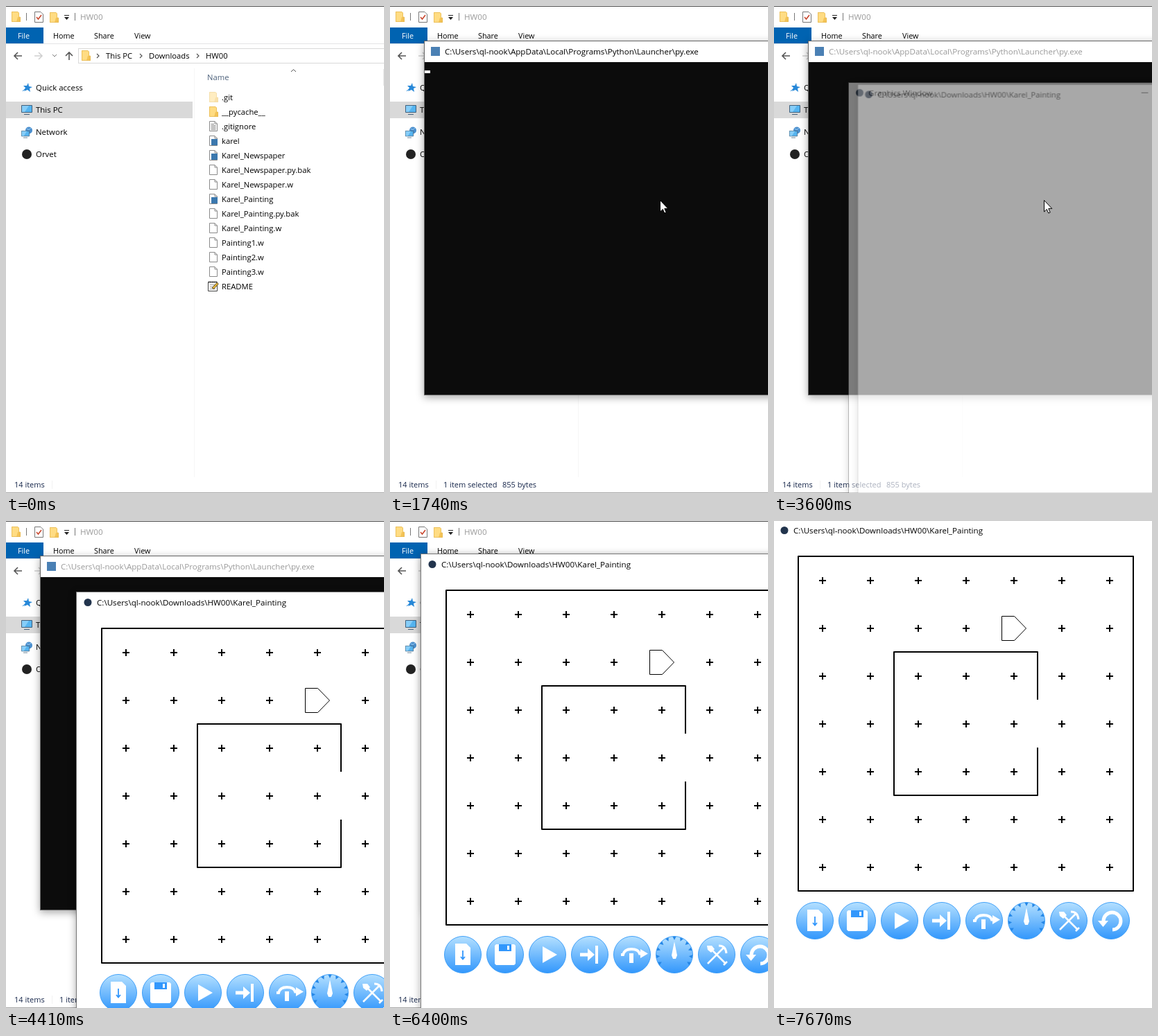
An HTML page that plays this animation: 545 px wide and 703 px high, repeating every 8000 ms.

```html
<!DOCTYPE html>
<html lang="en">
<head>
<meta charset="utf-8">
<title>Opening a script</title>
<style>
html, body { margin: 0; width: 100%; height: 100%; overflow: hidden; background: #fff; }
svg { display: block; width: 545px; height: 703px; font: 11.25px "Open Sans", "Noto Sans", sans-serif; }
.tab { font-size: 10.8px; }
.nav { font-size: 11.45px; }
.title { font-size: 11.6px; }
.status { font-size: 11px; fill: #16264a; }
.line { fill: none; stroke: #000; }
.win { filter: drop-shadow(0 3px 6px rgb(0 0 0 / .35)); }

.anim { animation: 8s step-end -20ms infinite; }
#cursor { animation-name: point; opacity: 0; }
#hover { animation-name: hover; opacity: 0; }
#selected { animation-name: select; opacity: 0; }
#count { animation-name: count; opacity: 0; }
#folderTitle { animation-name: focusFolder; fill: #999; }
#consoleTitle { animation-name: focusConsole; fill: #000; }
#console { animation-name: openConsole; opacity: 0; transform-origin: 530px 290px; }
#caret { animation-name: caret; opacity: 0; }
#blank { animation-name: blank; opacity: 0; transform-origin: 377px 475px; }
#drag { animation-name: drag; }
#karel { animation-name: openKarel; opacity: 0; transform-origin: 680px 428px; }
#world { animation-name: world; opacity: 0; }

@keyframes point {
  0% { opacity: 0; transform: translate(560px, 656px); }
  2.425% { opacity: 1; transform: translate(560px, 656px); animation-timing-function: steps(5); }
  6.575% { opacity: 1; transform: translate(445px, 396px); animation-timing-function: steps(4); }
  9.875% { opacity: 1; transform: translate(401px, 220px); animation-timing-function: steps(3); }
  12.375% { opacity: 1; transform: translate(389px, 280px); }
  53.375% { opacity: 1; transform: translate(407px, 238px); }
  54.25% { opacity: 1; transform: translate(441px, 162px); }
  55.125%, 100% { opacity: 0; transform: translate(441px, 162px); }
}
@keyframes hover {
  6.575% { opacity: 1; transform: translateY(273px); }
  7.4% { opacity: 1; transform: translateY(231px); }
  8.225% { opacity: 1; transform: translateY(168px); }
  9.05% { opacity: 1; transform: translateY(126px); }
  9.875% { opacity: 1; transform: translateY(84px); }
  10.7% { opacity: 1; transform: translateY(105px); }
  11.54% { opacity: 1; transform: translateY(126px); }
  12.375% { opacity: 1; transform: translateY(147px); }
  15.75%, 100% { opacity: 0; transform: translateY(147px); }
}
@keyframes select {
  15.75% { opacity: 1; fill: #cce8ff; }
  19.125%, 100% { opacity: 1; fill: #d9d9d9; }
}
@keyframes count { 15.75%, 100% { opacity: 1; } }
@keyframes focusFolder { 15.75% { fill: #000; } 19.125%, 100% { fill: #999; } }
@keyframes focusConsole { 23.25%, 100% { fill: #999; } }
@keyframes openConsole {
  19.125% { opacity: .354; transform: scale(.9677); }
  20.25% { opacity: .75; transform: scale(.988); }
  21.125% { opacity: .95; transform: scale(.997); }
  21.75%, 100% { opacity: 1; transform: none; }
}
@keyframes caret { 19.125% { opacity: 1; } 23.25%, 100% { opacity: 0; } }
@keyframes blank {
  23.25% { opacity: .354; transform: scale(.9677); }
  24.125% { opacity: .75; transform: scale(.988); }
  24.875% { opacity: .95; transform: scale(.997); }
  25.75% { opacity: 1; transform: none; }
  45% { opacity: .465; transform: scale(.9785); }
  45.875% { opacity: .15; transform: scale(.96); }
  46.75%, 100% { opacity: 0; transform: scale(.95); }
}
@keyframes openKarel {
  45% { opacity: .345; transform: scale(.967); }
  45.875% { opacity: .75; transform: scale(.988); }
  46.75% { opacity: .95; transform: scale(.997); }
  47.625%, 100% { opacity: 1; transform: none; }
}
@keyframes world { 48.5%, 100% { opacity: 1; } }
@keyframes drag {
  0% { transform: translate(0, 0); }
  64.3% { transform: translate(0, 0); animation-timing-function: steps(4); }
  67.5875% { transform: translate(-8px, -8px); animation-timing-function: steps(5); }
  71.7125% { transform: translate(-48px, -48px); animation-timing-function: steps(4); }
  75% { transform: translate(-56px, -52px); }
  79.25% { transform: translate(-56px, -54px); }
  80% { transform: translate(-57px, -55px); animation-timing-function: steps(3); }
  82.5% { transform: translate(-63px, -61px); animation-timing-function: steps(5); }
  86.675% { transform: translate(-98px, -96px); animation-timing-function: steps(2); }
  88.375% { transform: translate(-100px, -100px); }
  90% { transform: translate(-102px, -102px); }
  90.875% { transform: translate(-103px, -103px); }
  95.875%, 100% { transform: translate(-103px, -104px); }
}
</style>
</head>
<body>
<svg viewBox="0 0 545 703">
  <defs>
    <linearGradient id="sky" x2="0" y2="1">
      <stop stop-color="#b4e0ff"/><stop offset="1" stop-color="#3297fc"/>
    </linearGradient>
    <g id="folder">
      <path d="M0 0H9L11 2V15H0Z" fill="#ffdc83"/>
      <path d="M9 8H13V15H7Z" fill="#f3c357"/>
      <path d="M.5 .5H9L10.5 2V8H12.5V14.5H.5Z" fill="none" stroke="#e8b951" stroke-width=".8"/>
    </g>
    <g id="page">
      <path d="M.5 .5H8L11.5 4V14.5H.5Z" fill="#fff" stroke="#8a8a8a"/>
      <path d="M8 .5V4H11.5" fill="none" stroke="#8a8a8a"/>
    </g>
    <g id="text">
      <use href="#page"/>
      <path d="M2.5 4.5H7M2.5 6.5H9.5M2.5 8.5H9.5M2.5 10.5H9.5M2.5 12.5H9.5" stroke="#8a8a8a"/>
    </g>
    <g id="script">
      <use href="#page"/>
      <rect x="3" y="5" width="9" height="9" fill="#3b78ae"/>
    </g>
    <g id="note">
      <path d="M-1.5 1.5H11.5V14.5H-1.5Z" fill="#fff" stroke="#444"/>
      <path d="M-1 1.5H11" stroke="#333" stroke-width="2" stroke-dasharray="1.5 1"/>
      <path d="M1 5.5H8M1 8.5H6M1 11.5H9" stroke="#999"/>
      <path d="M5 11L12.5 3" stroke="#5a4a20" stroke-width="3.4"/>
      <path d="M5.5 10.5L12 3.5" stroke="#e9b83c" stroke-width="2"/>
    </g>
    <g id="monitor">
      <path d="M.5 .5H15.5V10.5H.5Z" fill="#55b4f0" stroke="#41607c"/>
      <path d="M1 1H11L5 10H1Z" fill="#86cdf8"/>
      <path d="M4 13.5H12" stroke="#41607c"/>
    </g>
    <path id="chevron" d="M0 -3L3 0L0 3" fill="none" stroke="#555" stroke-width="1.2"/>
    <circle id="badge" cx="118" cy="117.500" r="5.500" fill="#22344d"/>
  </defs>

  <g id="explorer">
    <rect width="545" height="703" fill="#fff"/>
    <path d="M0 .5H545" stroke="#505050"/>
    <path d="M0 702.500H545" stroke="#a8a8a8"/>
    <path d="M0 54.500H545" stroke="#e3e4e5"/>
    <use href="#folder" x="8" y="8"/>
    <path d="M29.500 10V21M99.500 10V21" stroke="#777"/>
    <path d="M41.500 8.500H50L53.500 12V23.500H41.500Z" fill="#fff" stroke="#777"/>
    <path d="M44 16L46.500 19L51 13" class="line" style="stroke:#c8452c;stroke-width:1.6"/>
    <use href="#folder" x="63" y="9"/>
    <path d="M84 13.500H91" stroke="#222"/><path d="M84 16H91L87.500 20Z" fill="#222"/>
    <text id="folderTitle" class="title anim" x="107" y="20">HW00</text>

    <rect y="31" width="54" height="23" fill="#0063b1"/>
    <g class="tab">
      <text x="17" y="47" fill="#fff">File</text>
      <text x="68" y="47">Home</text><text x="127" y="47">Share</text><text x="185" y="47">View</text>
    </g>
    <path d="M23 72H12M17 67L12 72L17 77" class="line" style="stroke:#555;stroke-width:1.6"/>
    <path d="M41 72H52M47 67L52 72L47 77" class="line" style="stroke:#d0d0d0;stroke-width:1.6"/>
    <path d="M67 70L70 73L73 70" class="line" style="stroke:#777"/>
    <path d="M91 78V67M86 72L91 67L96 72" class="line" style="stroke:#555;stroke-width:1.6"/>
    <rect x="104.500" y="61.500" width="460" height="21" fill="#fff" stroke="#d9d9d9"/>
    <use href="#folder" x="109" y="64"/>
    <use href="#chevron" x="131" y="72"/><use href="#chevron" x="193" y="72"/><use href="#chevron" x="275" y="72"/>
    <text x="144" y="76">This PC</text><text x="206" y="76">Downloads</text><text x="288" y="76">HW00</text>

    <rect y="138" width="269" height="24" fill="#d9d9d9"/>
    <path d="M271.500 90V680" stroke="#f6f6f6"/>
    <path d="M32 111L33 116L38 117L34 119L35 124L31 121L26 123L28 118L25 115L30 115Z" fill="#2788d8"/>
    <path d="M24 123L28 119" stroke="#2788d8"/>
    <use href="#monitor" x="22" y="143"/>
    <circle cx="33" cy="179.500" r="5" fill="#4b8fce"/>
    <path d="M30 177Q33 180 36 176" class="line" style="stroke:#a5d4f4"/>
    <use href="#monitor" transform="translate(22 180) scale(.75)"/>
    <circle cx="30" cy="214" r="7" fill="#222"/>
    <g class="nav">
      <text x="43" y="122">Quick access</text><text x="43" y="154">This PC</text>
      <text x="43" y="186">Network</text><text x="43" y="218">Orvet</text>
    </g>

    <text x="290" y="107" fill="#4c607a">Name</text>
    <path d="M411 95L414.500 91.500L418 95" class="line" style="stroke:#555"/>
    <path d="M544.500 91V115" stroke="#e5e5e5"/>
    <rect id="hover" class="anim" x="287" y="121" width="260" height="22" fill="#e5f3ff"/>
    <rect id="selected" class="anim" x="287" y="268" width="260" height="22"/>
    <g id="files"></g>

    <g class="status">
      <text x="12" y="695">14 items</text>
      <g id="count" class="anim"><text x="77" y="695">1 item selected</text><text x="162" y="695">855 bytes</text></g>
    </g>
    <path d="M66.500 685V697" stroke="#f2f2f2"/>
  </g>

  <g id="console" class="win anim">
    <rect x="50" y="51" width="960" height="510" fill="#0c0c0c"/>
    <rect x="50" y="51" width="960" height="30" fill="#fff"/>
    <rect x="49.500" y="50.500" width="961" height="511" fill="none" stroke="#666"/>
    <rect x="59" y="59" width="13" height="13" fill="#4a80b4"/>
    <text id="consoleTitle" class="title anim" x="79" y="70">C:\Users\ql-nook\AppData\Local\Programs\Python\Launcher\py.exe</text>
    <rect id="caret" class="anim" x="50" y="93" width="8" height="4" fill="#fff"/>
  </g>

  <g id="blank" class="win anim">
    <rect x="101.500" y="102.500" width="552" height="745" fill="#fff" stroke="#555"/>
    <use href="#badge"/>
    <text class="title" x="131" y="122">Graphics Window</text>
    <path d="M533 117.500H543" stroke="#000"/>
  </g>

  <g id="drag" class="anim">
    <g id="karel" class="win anim">
      <rect x="101.500" y="102.500" width="1157" height="740" fill="#fff" stroke="#777"/>
      <use href="#badge"/>
      <text class="title" x="131" y="122">C:\Users\ql-nook\Downloads\HW00\Karel_Painting</text>
      <g id="world" class="anim">
        <g class="line" stroke-width="2">
          <path d="M138 155H621V638H138Z" stroke-linejoin="round"/>
          <path d="M483 362V293H276V500H483V431" stroke-linejoin="round"/>
          <path id="crosses"/>
        </g>
        <path d="M431.500 241.500H449.500L466.500 259L449.500 276.500H431.500Z" fill="#fff" stroke="#000"/>
        <g id="buttons" fill="#fff"></g>
      </g>
    </g>
  </g>

  <path id="cursor" class="anim" d="M.5 .5V17L4.300 13.400L6.800 19L9.200 18L6.800 12.400H11.800Z" fill="#fff" stroke="#000"/>
</svg>
<script>
const byId = id => document.getElementById(id);

const files = [
  ['folder', '.git'], ['folder', '__pycache__'], ['text', '.gitignore'],
  ['script', 'karel'], ['script', 'Karel_Newspaper'],
  ['page', 'Karel_Newspaper.py.bak'], ['page', 'Karel_Newspaper.w'],
  ['script', 'Karel_Painting'],
  ['page', 'Karel_Painting.py.bak'], ['page', 'Karel_Painting.w'],
  ['page', 'Painting1.w'], ['page', 'Painting2.w'], ['page', 'Painting3.w'],
  ['note', 'README']
];
byId('files').innerHTML = files.map(([icon, name], i) => {
  const y = 132 + 21 * i;
  return `<use href="#${icon}" x="293" y="${y - 8}" opacity="${i ? 1 : .5}"/>
    <text x="311" y="${y + 4}">${name}</text>`;
}).join('');

let crosses = '';
for (let i = 0; i < 49; i++) {
  const x = 173 + 69 * (i % 7), y = 190 + 69 * Math.floor(i / 7);
  crosses += `M${x - 5} ${y}h10M${x} ${y - 5}v10`;
}
byId('crosses').setAttribute('d', crosses);

const blue = '#3297fc';
const stroke = (d, width, color = '#fff') =>
  `<path d="${d}" fill="none" stroke="${color}" stroke-width="${width}"/>`;
const fill = (d, color = '#fff') => `<path d="${d}" fill="${color}"/>`;

// Ticks along the rim of the speed dial
let ticks = '';
for (let a = -120; a <= 120; a += 24) {
  ticks += `<path transform="rotate(${a})" d="M-2.500-26H2.500L0-21Z" fill="#2486e6"/>`;
}

const icons = [
  // load, save, run, step
  fill('M-11-16H5L11-10V15H-11Z') + stroke('M0-6V6M-3 3L0 6.500L3 3', 1.800, blue),
  fill('M-13-15H13L15-13V13L13 15H-13L-15 13V-13Z') + fill('M-9-15H9V-5H-9Z', blue) + fill('M3-13H6V-7H3Z'),
  fill('M-7-12L14 0L-7 12Z'),
  fill('M-14-2.500H-3V-9L7 0L-3 9V2.500H-14ZM8-13H12V13H8Z'),
  // step over, speed, tools, reset
  stroke('M-16 0H-13Q-11-8-1-8T11-1.500H14', 4) + fill('M12-8L23-1.500L12 5ZM-4-2H2V12H-4Z'),
  ticks + fill('M0-19L4 1L2 6H-2L-4 1Z'),
  stroke('M-8-8L13 13M11-11L-13 13', 2.500) + fill('M-14-13L-7-13L-3-8L-8-3L-13-7Z') +
    stroke('M3-13Q13-13 14-2', 3) + stroke('M10 15L15 10', 2.500),
  stroke('M-11 0A12.500 12.500 0 1 1 2 13', 5) + fill('M-19 0H-4L-11.500 9Z')
];
byId('buttons').innerHTML = icons.map((icon, i) =>
  `<g transform="translate(${162 + 61 * i} 681)">
    <circle r="26.500" fill="url(#sky)" stroke="#3f9ff8"/>${icon}</g>`).join('');
</script>
</body>
</html>
```
